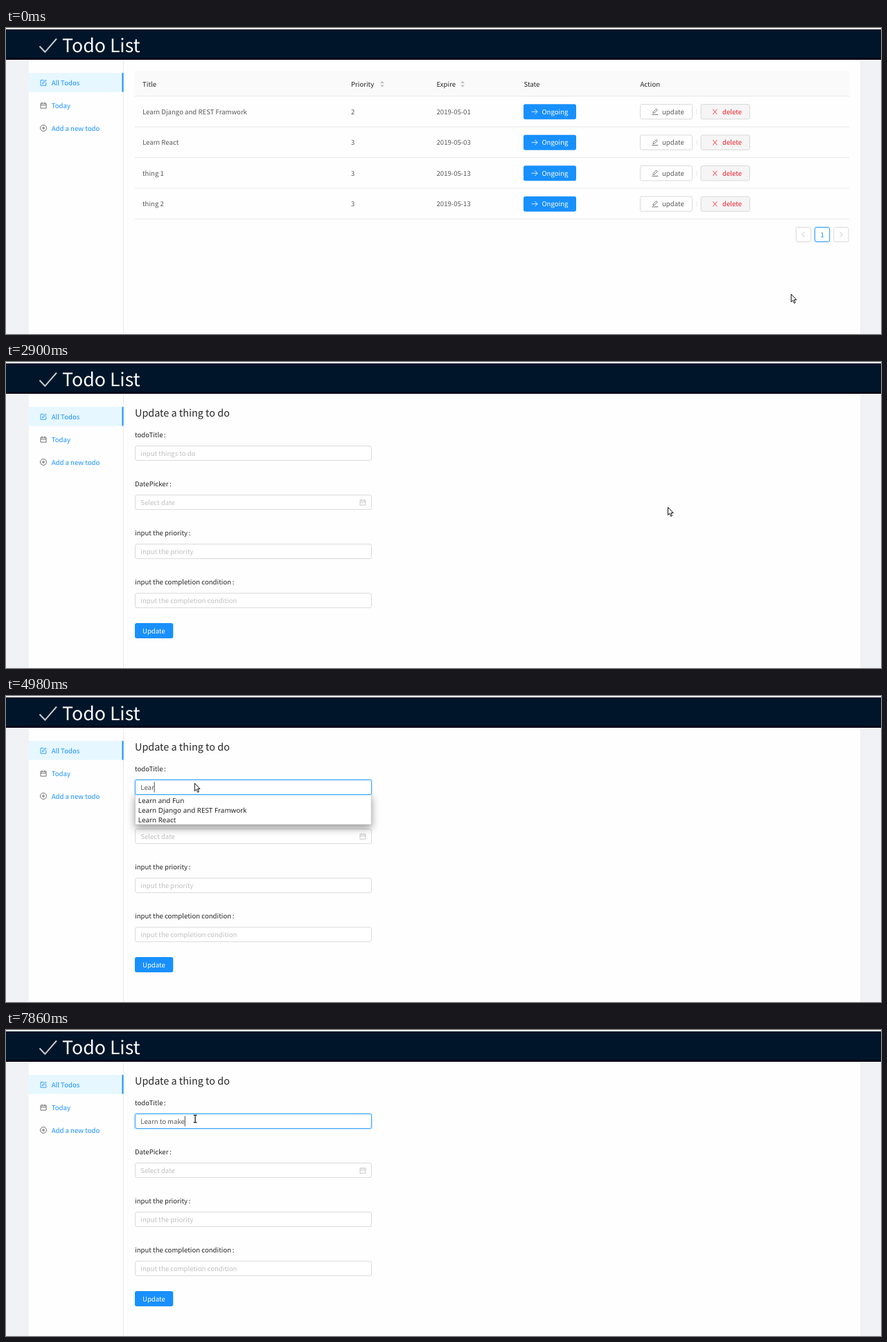
These frames come from a looping animation (1263 px wide and 443 px high, 8 s). An HTML page:

```html
<!DOCTYPE html>
<html lang="en">
<head>
<meta charset="utf-8">
<title>Todo List</title>
<style>
html, body { margin: 0; width: 100%; height: 100%; overflow: hidden; background: #f0f2f5; }
svg { display: block; width: 1263px; height: 443px; }
text { font: 9.6px "Noto Sans CJK SC", "Noto Sans CJK JP", "Noto Sans CJK TC", sans-serif; white-space: pre; text-rendering: geometricPrecision; }
.native text { font: 9.85px "Noto Sans", "Open Sans", sans-serif; }
.medium { font-weight: 500; }
.icon { fill: none; stroke-width: .85; }
</style>
</head>
<body>
<svg id="stage" viewBox="0 0 1263 443"></svg>
<script>
const BLUE = '#1890ff', BODY = '#595959', DARK = '#262626', LINE = '#e8e8e8', EDGE = '#d9d9d9', HINT = '#bfbfbf', RED = '#f5222d';
const LOOP = 8000, FORM_AT = 2900;

const text = (x, y, str, fill = BODY, attrs = '') => `<text x="${x}" y="${y}" fill="${fill}" ${attrs}>${str}</text>`;
const rect = (x, y, w, h, fill, attrs = '') => `<rect x="${x}" y="${y}" width="${w}" height="${h}" fill="${fill}" ${attrs}/>`;
const box = (x, y, w, h, stroke, fill = '#fff', attrs = '') => rect(x, y, w, h, fill, `rx="2.5" stroke="${stroke}" ${attrs}`);
const icon = (x, y, stroke, d) => `<path class="icon" transform="translate(${x} ${y})" stroke="${stroke}" d="${d}"/>`;

const CALENDAR = 'M.5 1.5H8.5V8.5H.5ZM.5 4H8.5M2.6 0V2.4M6.4 0V2.4';
const PENCIL = 'M0 9H9M1.6 7L2 5L6.4 .6L8 2.2L3.6 6.6Z';

function frame() {
  const links = [[82.7, 'All Todos'], [115.7, 'Today'], [148.5, 'Add a new todo']];
  return rect(33, 46, 1200, 397, '#fefefe') + rect(0, 0, 1263, 2, '#f4f5f6') +
    rect(0, 2, 1263, 44, '#001529') + rect(0, 43, 1263, 3, '#030019') +
    '<path d="M48.5 26.5L56.3 34.8L73 15.5" fill="none" stroke="#c8ccd0" stroke-width="2"/>' +
    text(81, 35.3, 'Todo List', '#fff', 'style="font-size:26.7px"') +
    rect(169, 46, 1, 397, LINE) + rect(33, 65, 136.5, 27.5, '#e6f7ff') + rect(167.5, 65, 2, 27.5, BLUE) +
    links.map(([y, s]) => text(65.7, y, s, BLUE)).join('') +
    icon(49.5, 74.7, BLUE, 'M5 .7H.5V8.5H8.3V4M3 6L3.3 4.5L7.4 .4L8.6 1.6L4.5 5.7Z') +
    icon(49.5, 107.6, BODY, CALENDAR) +
    icon(49.5, 140.4, BODY, 'M0 4.5A4.5 4.5 0 1 0 9 4.5A4.5 4.5 0 1 0 0 4.5M2.2 4.5H6.8M4.5 2.2V6.8');
}

function listView() {
  const heads = [[197, 'Title'], [498, 'Priority'], [621.5, 'Expire'], [747.5, 'State'], [915.5, 'Action']];
  const rows = [['Learn Django and REST Framwork', 2, '01'], ['Learn React', 3, '03'], ['thing 1', 3, '13'], ['thing 2', 3, '13']];
  const sorter = x => `<path fill="${HINT}" d="M${x} 80l2.8-3.4l2.8 3.4zM${x} 82.4l2.8 3.4l2.8-3.4z"/>`;
  const row = ([title, priority, day], i) => {
    const y = 121.2 + i * 44.5, base = y + 3.7;
    return rect(186, y - 22, 1031, 44, 'none', `id="row${i}"`) + rect(186, y + 21.4, 1031, 1, LINE) +
      text(197, base, title) + text(498, base, priority) + text(621.5, base, '2019-05-' + day) +
      rect(747, y - 11, 76, 22, BLUE, 'rx="2.7"') + icon(758.5, y - 4, '#fff', 'M0 4H8.6M4.8 .2L8.6 4L4.8 7.8') +
      text(773.5, base, 'Ongoing', '#fff') +
      `<g id="update${i}">` + box(915.5, y - 10.7, 75, 21.4, EDGE) +
      icon(932.3, y - 4.8, BODY, PENCIL) + text(947, base, 'update') + '</g>' +
      rect(996.5, y - 4, 1, 8, LINE) + box(1003, y - 10.7, 70.5, 21.4, EDGE, '#f5f5f5') +
      icon(1020.4, y - 3.6, RED, 'M0 0L6 7.4M6 0L0 7.4') + text(1034, base, 'delete', RED);
  };
  const page = (x, stroke) => box(x, 288.5, 21.3, 21, stroke);
  return rect(186, 62, 1031, 37, '#fafafa') + rect(186, 98.2, 1031, 1, LINE) +
    heads.map(([x, s]) => text(x, 84.7, s, DARK, 'class="medium"')).join('') + sorter(540.2) + sorter(656.3) +
    rows.map(row).join('') + page(1140.5, EDGE) + page(1167.5, BLUE) + page(1194.8, EDGE) +
    text(1175.4, 302.5, '1', BLUE, 'class="medium"') +
    icon(1149, 295.6, HINT, 'M4 0L0 3.5L4 7') + icon(1203.5, 295.6, HINT, 'M0 0L4 3.5L0 7');
}

function formView() {
  const fields = [['todoTitle', 'input things to do'], ['DatePicker', 'Select date'],
    ['input the priority', 'input the priority'], ['input the completion condition', 'input the completion condition']];
  const field = ([label, hint], i) => {
    const y = i * 71.1;
    return text(186, 108.5 + y, `${label}<tspan dx="1.6">:</tspan>`, DARK) +
      (i ? box(186.5, 121.5 + y, 341, 21, EDGE) + text(194.3, 135.7 + y, hint, HINT) : '');
  };
  const options = ['Learn and Fun', 'Learn Django and REST Framwork', 'Learn React'];
  return text(186, 79, 'Update a thing to do', DARK, 'class="medium" style="font-size:14.4px"') +
    fields.map(field).join('') + icon(510.5, 198.7, HINT, CALENDAR) +
    rect(186, 378, 55.3, 22, BLUE, 'rx="2.7"') + text(197, 393, 'Update', '#fff') +
    '<g id="menu" class="native">' +
    rect(186.7, 141, 340.5, 45, '#fff', 'stroke="#c4c4c4" stroke-width=".7" style="filter:drop-shadow(0 5px 6px rgba(0,0,0,.4))"') +
    options.map((s, i) => text(190.8, 155.2 + i * 13.7, s, '#222')).join('') + '</g>' +
    box(185.8, 120.8, 342.4, 22.4, BLUE, 'none', 'id="glow" stroke-width="1.6" stroke-opacity=".25"') +
    box(186.5, 121.5, 341, 21, EDGE, '#fff', 'id="input"') +
    text(194.3, 135.7, '', BODY, 'id="typed"') + rect(0, 124.5, .9, 15, '#333', 'id="caret"');
}

const cursors = {
  arrow: '<path d="M.3 .3V11.6L2.8 9.2L4.6 13.4L6.4 12.6L4.6 8.5H8Z" fill="#fff" stroke="#111" stroke-width="1"/>',
  hand: '<path d="M-1.2 1Q0-.4 1 1V4.3L5 5.2Q6 5.6 5.8 7L5 11.3H-1.3L-4.6 7.3Q-4.6 5.8-3 6.4L-1.2 7.6Z" fill="#fff" stroke="#111" stroke-width="1"/><path d="M1 4.5V6M3 5V6.3" stroke="#111" stroke-width=".7"/>',
  beam: '<path d="M-1.4-2.6H3.6M-1.4 7.8H3.6M1.1-2.6V7.8" fill="none" stroke="#fff" stroke-width="2.6"/><path d="M-1.4-2.6H3.6M-1.4 7.8H3.6M1.1-2.6V7.8" fill="none" stroke="#222" stroke-width="1.3"/>'
};

stage.innerHTML = frame() + `<g id="list">${listView()}</g><g id="form">${formView()}</g><g id="cursor">` +
  Object.entries(cursors).map(([k, s]) => `<g id="${k}">${s}</g>`).join('') + '</g>';

const $ = id => document.getElementById(id);
const show = (id, on) => $(id).style.display = on ? '' : 'none';
const ramp = (t, a, b) => Math.min(1, Math.max(0, (t - a) / (b - a)));

// time, x, y of the pointer
const path = [[0, 1133, 385], [500, 1133, 385], [780, 1070, 411], [1080, 935, 400], [1330, 985, 340],
  [1560, 1014, 286], [1850, 968, 220], [2080, 956, 210], [3240, 955, 210], [3420, 872, 238],
  [3570, 690, 249], [3720, 420, 200], [3820, 264, 150], [3890, 272, 126.5], [4050, 272, 126], [LOOP, 272, 126]];

function pointer(t) {
  const i = path.findIndex((p, k) => k && t <= p[0]), a = path[i - 1], b = path[i];
  const u = (t - a[0]) / (b[0] - a[0]);
  const slope = (k, c) => {
    const p = path[k - 1], n = path[k + 1], q = path[k];
    if (!p || !n || n[0] - p[0] > 900) return 0;
    return (n[c] - p[c]) / (n[0] - p[0]) * (b[0] - a[0]);
  };
  return [1, 2].map(c => {
    const v = 1 - u;
    return a[c] * v * v * (1 + 2 * u) + b[c] * u * u * (3 - 2 * u) +
      slope(i - 1, c) * u * v * v - slope(i, c) * u * u * v;
  });
}

const phrase = 'Learn to make';
const keys = [4210, 4510, 4670, 4980, 5460, 5620, 6930, 7010, 7160, 7310, 7540, 7710, 7860];

function draw(t) {
  const [x, y] = pointer(t), onForm = t >= FORM_AT;
  show('list', !onForm);
  show('form', onForm);

  let overUpdate = false;
  for (let i = 0; i < 4; i++) {
    const mid = 121.2 + i * 44.5, inRow = !onForm && Math.abs(y - mid) < 22.2;
    const hot = inRow && Math.abs(y - mid) < 11.5 && x > 915 && x < 991;
    overUpdate ||= hot;
    $('row' + i).setAttribute('fill', inRow ? '#e6f7ff' : 'none');
    const [edge, pen, label] = $('update' + i).children;
    edge.setAttribute('stroke', hot ? '#40a9ff' : EDGE);
    pen.setAttribute('stroke', hot ? '#40a9ff' : BODY);
    label.setAttribute('fill', hot ? '#40a9ff' : BODY);
  }

  const menu = ramp(t, 4180, 4350) * (1 - ramp(t, 7000, 7150));
  show('menu', menu > 0);
  $('menu').style.opacity = menu;
  const hover = ramp(t, 3830, 3990);
  $('input').setAttribute('stroke', `color-mix(in srgb, #40a9ff ${hover * 100}%, ${EDGE})`);
  $('glow').style.opacity = ramp(t, 4100, 4350);

  const count = keys.filter(k => k <= t).length, typed = $('typed');
  typed.textContent = count ? phrase.slice(0, count) : 'input things to do';
  typed.setAttribute('fill', count ? BODY : HINT);
  show('caret', t >= 4130 && !(t >= 5840 && t < 6930));
  $('caret').setAttribute('x', 194.3 + (count && onForm ? typed.getComputedTextLength() : 0));

  const overInput = onForm && x < 528 && y > 121 && y < 143 && menu < .5;
  const kind = overUpdate ? 'hand' : overInput ? 'beam' : 'arrow';
  for (const k in cursors) show(k, k === kind);
  $('cursor').setAttribute('transform', `translate(${x} ${y})`);
}

function tick() {
  draw(performance.now() % LOOP);
  requestAnimationFrame(tick);
}
tick();
</script>
</body>
</html>
```
